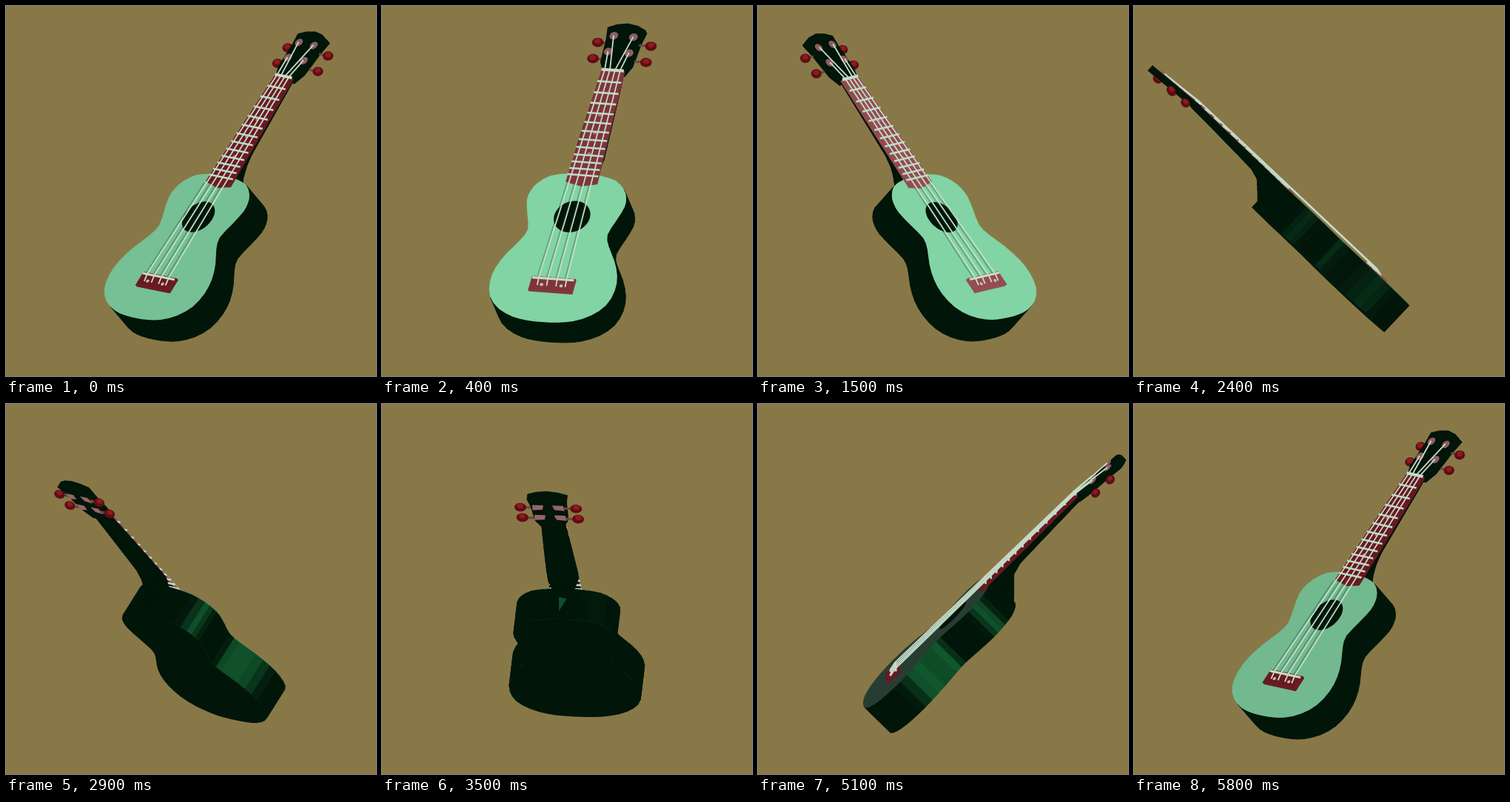
An HTML page with a canvas that plays this animation: 500x500 px, repeating every 5900 ms.

```html
<!DOCTYPE html>
<html lang="en">
<head>
<meta charset="utf-8">
<title>Turning ukulele</title>
<style>
html, body { margin: 0; width: 100%; height: 100%; overflow: hidden; background: #887848; }
canvas { display: block; width: 500px; height: 500px; }
</style>
</head>
<body>
<canvas id="stage" width="500" height="500"></canvas>
<script>
const ctx = document.getElementById('stage').getContext('2d');
const LOOP = 5900, STEP = 100, TURN = 5835, FRONT_AT = 715;
const H = Math.SQRT1_2, SE = Math.sin(12 * Math.PI / 180), CE = Math.cos(12 * Math.PI / 180);
const LIGHT = [0.3, 0.3, 0.9];
const DARK = [1, 21, 9], PALE = 'rgb(199,219,201)';
const NUT = 408, SADDLE = 67, THICK = 49;

// Body-space axes: s along the neck, w across, d out of the front.
let sin, cos, deg, cam, lit;

const clamp = v => Math.max(0, Math.min(1, v));
const mix = (a, b, k) => a.map((v, i) => v + (b[i] - v) * k);
const rgb = c => `rgb(${c.map(Math.round).join(',')})`;

function setAngle(t) {
  deg = (t - FRONT_AT) * 360 / TURN;
  if (deg > 180) deg -= 360;
  const a = deg * Math.PI / 180;
  sin = Math.sin(a);
  cos = Math.cos(a);
  const axes = { s: [-sin * H, H, -cos * H], w: [cos, 0, -sin], d: [sin * H, H, cos * H] };
  const along = v => ({ s: dot(axes.s, v), w: dot(axes.w, v), d: dot(axes.d, v) });
  cam = along([0, SE, CE]);
  lit = along(LIGHT);
}

function dot(a, b) { return a[0] * b[0] + a[1] * b[1] + a[2] * b[2]; }

function project(s, w, d) {
  const r = -113 + H * (s - d), h = H * (s + d), u = w - 1;
  return [255 - r * sin + u * cos, 405 - h * CE - (r * cos + u * sin) * SE];
}

function trace(pts) {
  ctx.beginPath();
  pts.forEach(p => ctx.lineTo(p[0], p[1]));
}

function fill(pts, color, seam = 0) {
  trace(pts);
  ctx.closePath();
  ctx.fillStyle = color;
  ctx.fill();
  if (seam) {
    ctx.strokeStyle = color;
    ctx.lineWidth = seam;
    ctx.stroke();
  }
}

function line(pts, color, width) {
  trace(pts.map(p => project(...p)));
  ctx.strokeStyle = color;
  ctx.lineWidth = width;
  ctx.stroke();
}

function sideColor(ns, nw) {
  const k = Math.pow(Math.max(0, ns * lit.s + nw * lit.w), 30);
  return rgb(mix(DARK, [20, 98, 52], k));
}

// Solid with a flat outline [s, w] between two depths given as functions of s.
function prism(outline, front, back, capColor, wallColor) {
  const walls = [];
  outline.forEach(([s, w], i) => {
    const [s2, w2] = outline[(i + 1) % outline.length];
    const len = Math.hypot(s2 - s, w2 - w) || 1;
    const ns = (w - w2) / len, nw = (s2 - s) / len;
    if (ns * cam.s + nw * cam.w <= 0) return;
    walls.push({
      depth: (s + s2) * cam.s + (w + w2) * cam.w,
      color: wallColor(ns, nw),
      pts: [project(s, w, front(s)), project(s2, w2, front(s2)),
            project(s2, w2, back(s2)), project(s, w, back(s))]
    });
  });
  walls.sort((a, b) => a.depth - b.depth);
  walls.forEach(q => fill(q.pts, q.color, 0.8));
  const face = cam.d > 0 ? front : back;
  fill(outline.map(([s, w]) => project(s, w, face(s))), cam.d > 0 ? capColor : rgb(DARK));
}

function blob(s, w, d, rs, rw, rd, color) {
  const c = project(s, w, d);
  const v = [project(s + rs, w, d), project(s, w + rw, d), project(s, w, d + rd)]
    .map(p => [p[0] - c[0], p[1] - c[1]]);
  const pts = [];
  for (let i = 0; i < 28; i++) {
    const a = i * Math.PI / 14, ux = Math.cos(a), uy = Math.sin(a);
    let x = 0, y = 0, n = 0;
    v.forEach(([vx, vy]) => {
      const k = vx * ux + vy * uy;
      x += vx * k;
      y += vy * k;
      n += k * k;
    });
    n = Math.sqrt(n) || 1;
    pts.push([c[0] + x / n, c[1] + y / n]);
  }
  fill(pts, color);
}

function mirror(half) {
  const inner = half.filter(p => p[1] > 0);
  return [...half, ...inner.reverse().map(([s, w]) => [s, -w])];
}

function smooth(pts, parts) {
  const n = pts.length, out = [];
  for (let i = 0; i < n; i++) {
    const [a, b, c, d] = [-1, 0, 1, 2].map(k => pts[(i + k + n) % n]);
    for (let j = 0; j < parts; j++) {
      const u = j / parts;
      out.push([0, 1].map(k => b[k] + 0.5 * u * (c[k] - a[k] +
        u * (2 * a[k] - 5 * b[k] + 4 * c[k] - d[k] + u * (3 * (b[k] - c[k]) + d[k] - a[k])))));
    }
  }
  return out;
}

const body = smooth(mirror([[0, 0], [1, 22], [5, 43], [16, 66], [34, 83], [58, 89.5], [82, 87],
  [106, 77], [129, 63], [147, 57], [171, 64], [193, 70], [208, 68.5], [221, 62], [234, 47],
  [240, 24], [242, 0]]), 2);
const head = mirror([[406, 0], [406, 15], [422, 22], [440, 23], [460, 24], [480, 27], [486, 15], [489, 0]]);
const board = mirror([[222, 0], [227, 22], [NUT, 16]]);
const bridge = mirror([[48, 0], [48, 31], [70, 31]]);
const hole = Array.from({ length: 40 }, (_, i) =>
  [171.5 + 25.5 * Math.sin(i * Math.PI / 20), 25.5 * Math.cos(i * Math.PI / 20)]);
// Stations [s, half width, depth] from nut to heel.
const neck = [[410, 15.5, 9], [386, 17, 9.5], [340, 19, 11], [287, 21, 13], [270, 21, 18],
  [260, 17, 28], [248, 10, 40], [240, 7, 47]];

const flat = d => () => d;
const headFront = s => 1 - (s - NUT) * 0.065;
const headBack = s => headFront(s) - 9;
const boardHalf = s => 16 + (NUT - s) * 6 / 181;

function drawNeck() {
  const ring = ([s, w, d]) => Array.from({ length: 9 }, (_, i) =>
    project(s, w * Math.cos(i * Math.PI / 8), -d * Math.sin(i * Math.PI / 8)));
  const rings = neck.map(ring), color = rgb(DARK);
  for (let i = 1; i < rings.length; i++) {
    const a = rings[i - 1], b = rings[i];
    for (let j = 0; j < 9; j++) {
      const k = (j + 1) % 9;
      fill([a[j], a[k], b[k], b[j]], color, 0.8);
    }
  }
}

function drawPegs(side) {
  [[460, -12], [433, -11]].forEach(([s, d]) => {
    line([[s, side * 21, d], [s, side * 33, d]], '#6a4648', 3);
    blob(s, side * 38, d, 6.5, 8, 5.5, '#5e0d14');
    blob(s + 1, side * 38.5, d + 1.5, 3.8, 4.5, 3, '#8f191f');
  });
}

function drawHead() {
  const near = cam.w > 0 ? 1 : -1;
  drawPegs(-near);
  prism(head, headFront, headBack, rgb(DARK), flat(rgb(DARK)));
  if (cam.d <= 0) {
    [460, 433].forEach(s => [-1, 1].forEach(m => {
      const d = headBack(s) - 1;
      fill([[s + 7, 6], [s + 7, 21], [s - 6, 22], [s - 4, 8]].map(([a, w]) => project(a, m * w, d)), '#976468');
    }));
  }
  drawPegs(near);
}

const strings = [[20, 11, 439, 15], [6.7, 3.7, 466, 14]].flatMap(([b, n, ps, pw]) =>
  [-1, 1].map(m => ({ low: m * b, nut: m * n, post: [ps, m * pw] })));

function drawPosts() {
  strings.forEach(({ post: [s, w] }) => blob(s, w, headFront(s) + 1, 6, 6, 2, '#8b5f60'));
}

function drawStrings() {
  strings.forEach(({ low, nut, post: [s, w] }) =>
    line([[56, low, 4], [SADDLE, low, 6.5], [NUT, nut, 4], [s, w, headFront(s) + 2]], PALE, 1.8));
}

function drawShadows() {
  if (lit.d < 0.3) return;
  const drop = 6 / lit.d;
  strings.forEach(({ low, nut }) => {
    const at = s => low + (nut - low) * (s - SADDLE) / (NUT - SADDLE) - drop * lit.w;
    line([[72, at(72), 0], [225, at(225), 0]], 'rgba(10,70,40,0.32)', 1.8);
  });
}

function drawBoard(wood) {
  prism(board, flat(2.5), flat(-1), wood, flat(wood));
  [335, 306, 272].forEach(s => blob(s, 0, 2.6, 2.4, 2.4, 0.3, 'rgb(180,118,122)'));
  for (let n = 1; n <= 12; n++) {
    const s = SADDLE - 1 + (NUT - SADDLE + 1) * Math.pow(2, -n / 12), w = boardHalf(s) + 0.5;
    line([[s, -w, 3], [s, w, 3]], 'rgb(187,217,196)', 2.6);
  }
  line([[NUT, -16, 3], [NUT, 16, 3]], PALE, 4);
}

function drawBridge(wood) {
  prism(bridge, flat(4), flat(0), wood, flat(wood));
  line([[SADDLE, -30, 5], [SADDLE, 30, 5]], PALE, 3.2);
  [-14, 14].forEach(w => blob(57, w, 4.5, 2.4, 2.4, 1, 'rgb(205,190,185)'));
}

function drawBody(green) {
  prism(body, flat(0), flat(-THICK), green, sideColor);
}

function draw(t) {
  setAngle(t);
  ctx.fillStyle = '#887848';
  ctx.fillRect(0, 0, 500, 500);
  ctx.lineJoin = 'round';
  const green = rgb(mix([36, 57, 47], [130, 212, 164], clamp((deg + 91) / 54)));
  const wood = rgb(mix([104, 25, 34], [147, 76, 81], clamp((deg + 45) / 48)));

  if (cam.d > 0) {
    drawNeck();
    drawHead();
    drawBody(green);
    fill(hole.map(([s, w]) => project(s, w, 0)), '#001408');
    drawShadows();
    drawBridge(wood);
    drawBoard(wood);
    drawPosts();
    drawStrings();
  } else {
    drawPosts();
    drawBridge(wood);
    drawStrings();
    drawBoard(wood);
    fill(body.map(([s, w]) => project(s, w, 0)), green, 1);
    drawBody(green);
    drawNeck();
    const glow = clamp((-cos - 0.85) * 8);
    if (glow > 0) {
      const heel = [[263, 4, -27], [262, -7, -29], [248, 4, -40]].map(p => project(...p));
      fill(heel, `rgba(18,76,46,${glow})`);
    }
    drawHead();
  }
}

function tick() {
  draw(Math.floor(performance.now() % LOOP / STEP) * STEP);
  requestAnimationFrame(tick);
}
tick();
</script>
</body>
</html>
```
